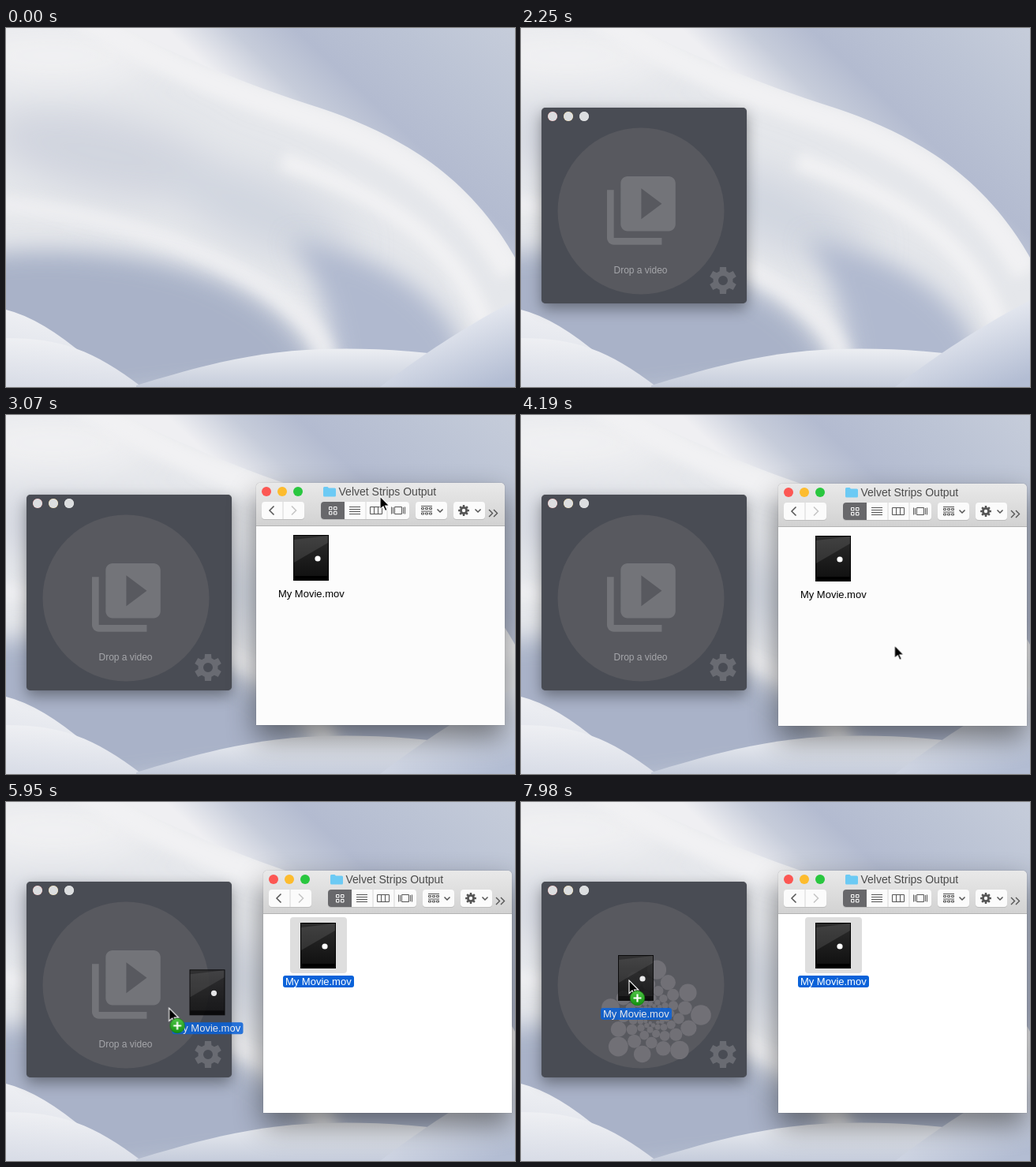
These frames come from a looping animation (645x455 px, 8 s). An HTML page:

```html
<!DOCTYPE html>
<html lang="en">
<head>
<meta charset="utf-8">
<title>Drop a video</title>
<style>
html, body { margin: 0; width: 100%; height: 100%; overflow: hidden; }
body { position: relative; background: #dfe2e9; font-family: "Liberation Sans", Arial, sans-serif; }
svg { position: absolute; left: 0; top: 0; display: block; overflow: visible; }
.win { position: absolute; left: 0; top: 0; }
#app, #finder, #cursor, #ghost, .balls, .balls g { animation: 8s linear infinite; }
.step { animation: 8s step-end infinite; }

#app { width: 260px; height: 248px; animation-name: appMove; }
#appBody { width: 100%; height: 100%; border-radius: 5px; background: #494c54; animation-name: appShadow; }
#appShow { animation-name: appShow; }
#idle { animation-name: idle; }
.prompt { animation: prompt 8s linear infinite; }
.balls { animation-name: ballsMove; fill: #717076; }
.balls g { animation-name: ballsSpin; }

#finderShow { animation-name: finderShow; }
#finder { width: 315px; height: 307px; animation-name: finderMove; }
#finderBody {
  width: 100%; height: 100%; border-radius: 5px 5px 0 0;
  box-shadow: 0 0 1px rgba(0,0,0,.5), 0 16px 36px rgba(0,0,0,.48);
  background: linear-gradient(#e9e9e9, #d2d2d2 54px, #b4b4b4 54px, #b4b4b4 55px, transparent 55px);
}
#page { animation-name: page; }
#picked { animation-name: picked; }
#plain { animation-name: plain; }

#ghostShow { animation-name: ghostShow; }
#ghost { animation-name: drag; animation-delay: 80ms; }
#cursorShow { animation-name: cursorShow; }
#cursor { animation-name: point; }
#badge { animation-name: badge; }

@keyframes appShow { 0% { visibility: hidden } 5.25%, 100% { visibility: visible } }
@keyframes appMove {
  0%, 5.25% { transform: translate(96px,190px); animation-timing-function: ease-out }
  11.875% { transform: translate(29px,113px) }
  14.75% { transform: translate(26px,102px) }
  15.5%, 100% { transform: translate(26px,101px) }
}
@keyframes appShadow {
  0% { box-shadow: 0 0 1px rgba(0,0,0,.5), 0 17px 36px rgba(0,0,0,.5) }
  28.125%, 100% { box-shadow: 0 0 1px rgba(0,0,0,.5), 0 7px 18px rgba(0,0,0,.38) }
}
@keyframes idle { 0% { opacity: 0 } 28.125%, 100% { opacity: 1 } }
@keyframes prompt { 0%, 76.25% { opacity: 1 } 79.5%, 100% { opacity: 0 } }
@keyframes ballsMove {
  0%, 76.25% { transform: translate(126px,126px) scale(0); animation-timing-function: ease-out }
  81.25% { transform: translate(149px,161px) scale(1) }
  86.25% { transform: translate(157px,167px) scale(1) }
  91.25% { transform: translate(154px,167px) scale(1) }
  95% { transform: translate(146px,165px) scale(1) }
  99.75%, 100% { transform: translate(141px,169px) scale(1) }
}
@keyframes ballsSpin { 0%, 76.25% { transform: rotate(-100deg) } 99.75%, 100% { transform: rotate(0) } }

@keyframes finderShow { 0% { visibility: hidden } 30.375%, 100% { visibility: visible } }
@keyframes finderMove {
  0%, 30.375% { transform: translate(243px,66px); animation-timing-function: ease-out }
  38.375% { transform: translate(317px,86px) }
  39.75% { transform: translate(320px,86px) }
  41.25%, 100% { transform: translate(326px,87px) }
}
@keyframes page { 0% { fill: #fcfcfc } 67.75%, 100% { fill: #fff } }
@keyframes picked { 0% { opacity: 0 } 57.5%, 100% { opacity: 1 } }
@keyframes plain { 0% { opacity: 1 } 57.5%, 100% { opacity: 0 } }

@keyframes ghostShow { 0% { visibility: hidden } 69.875%, 100% { visibility: visible } }
@keyframes drag {
  0%, 69.875% { transform: translate(326px,87px) }
  74.375% { transform: translate(146px,163px) }
  78.125% { transform: translate(29px,164px) }
  79.625% { transform: translate(33px,157px) }
  83.75% { transform: translate(89px,116px) }
  87.5% { transform: translate(112px,138px) }
  90.625% { transform: translate(58px,140px) }
  93.75% { transform: translate(70px,152px) }
  96.25% { transform: translate(88px,136px) }
  98.5%, 100% { transform: translate(76px,128px) }
}
@keyframes cursorShow {
  0% { visibility: hidden } 5.25% { visibility: visible }
  20% { visibility: hidden } 30.375%, 100% { visibility: visible }
}
@keyframes point {
  0%, 5.25% { transform: translate(235px,197px); animation-timing-function: ease-out }
  11.875% { transform: translate(168px,120px) }
  14.75% { transform: translate(165px,109px) }
  15.5%, 17.25% { transform: translate(165px,108px) }
  20%, 30.37% { transform: translate(293px,403px) }
  30.375% { transform: translate(400px,83px); animation-timing-function: ease-out }
  38.375% { transform: translate(474px,103px) }
  39.75% { transform: translate(477px,103px) }
  41.25% { transform: translate(483px,104px) }
  44.875%, 51.8% { transform: translate(485px,307px) }
  56.5%, 58.5% { transform: translate(392px,186px) }
  62.2%, 63.6% { transform: translate(473px,278px) }
  67.75%, 69.875% { transform: translate(387px,185px) }
  74.375% { transform: translate(207px,261px) }
  78.125% { transform: translate(90px,262px) }
  79.625% { transform: translate(94px,255px) }
  83.75% { transform: translate(150px,214px) }
  87.5% { transform: translate(173px,236px) }
  90.625% { transform: translate(119px,238px) }
  93.75% { transform: translate(131px,250px) }
  96.25% { transform: translate(149px,234px) }
  98.5%, 100% { transform: translate(137px,226px) }
}
@keyframes badge { 0% { opacity: 0 } 72.5%, 100% { opacity: 1 } }
</style>
</head>
<body>

<svg width="645" height="455" style="overflow:hidden">
  <defs>
    <filter id="b8" x="-30%" y="-30%" width="160%" height="160%"><feGaussianBlur stdDeviation="8"/></filter>
    <filter id="b15" x="-40%" y="-40%" width="180%" height="180%"><feGaussianBlur stdDeviation="15"/></filter>
    <filter id="b25" x="-50%" y="-60%" width="200%" height="220%"><feGaussianBlur stdDeviation="24"/></filter>
    <linearGradient id="far" gradientUnits="userSpaceOnUse" x1="250" y1="45" x2="490" y2="-210">
      <stop offset="0" stop-color="#efeff2"/><stop offset=".16" stop-color="#c6ccda"/>
      <stop offset=".32" stop-color="#b3bbd0"/><stop offset=".6" stop-color="#bcc4d5"/>
      <stop offset="1" stop-color="#cbd1dd"/>
    </linearGradient>
    <linearGradient id="hillA" x1=".5" y1="0" x2=".3" y2="1">
      <stop offset="0" stop-color="#f0f1f4"/><stop offset="1" stop-color="#d9dde7"/>
    </linearGradient>
    <linearGradient id="hillB" x1="0" y1="0" x2="0" y2="1">
      <stop offset="0" stop-color="#eceef2"/><stop offset="1" stop-color="#c5ccdb"/>
    </linearGradient>
    <linearGradient id="hillC" x1=".4" y1=".3" x2=".8" y2="1">
      <stop offset="0" stop-color="#e6e9f0"/><stop offset="1" stop-color="#b3bdd3"/>
    </linearGradient>
  </defs>
  <rect width="645" height="455" fill="#e5e7eb"/>
  <g filter="url(#b25)">
    <ellipse cx="125" cy="160" rx="150" ry="48" fill="#d0d4de" transform="rotate(12 125 160)"/>
    <ellipse cx="320" cy="232" rx="130" ry="42" fill="#d0d5df" transform="rotate(24 320 232)"/>
    <ellipse cx="60" cy="35" rx="130" ry="35" fill="#f1f1f3"/>
  </g>
  <g filter="url(#b15)">
    <path d="M-40 288C100 270 230 295 300 335C350 362 380 395 400 440L-40 490Z" fill="#a9b2c8"/>
    <path d="M360 268C440 280 520 310 570 385L590 450L420 450C415 380 400 320 360 268Z" fill="#b0b9cf"/>
  </g>
  <g fill="none" stroke="#f1f1f3" filter="url(#b8)">
    <path d="M-30 222C140 232 280 290 345 340C385 372 400 392 408 420" stroke-width="22" opacity=".8"/>
    <path d="M350 168C460 205 570 265 606 375" stroke-width="24"/>
    <path d="M90 -20C200 50 290 82 390 116C490 150 580 205 640 310" stroke-width="34"/>
  </g>
  <path d="M130 -10C215 35 300 70 400 102C500 136 590 188 650 300V-10Z" fill="url(#far)"/>
  <path d="M0 357Q45 368 103 418L120 455H0Z" fill="url(#hillA)"/>
  <path d="M0 393C70 393 110 408 172 455H0Z" fill="url(#hillA)"/>
  <path d="M165 453C260 424 320 410 400 407Q470 405 535 412L530 455H165Z" fill="url(#hillB)"/>
  <path d="M474 455C520 420 570 385 645 345V455Z" fill="url(#hillC)"/>
</svg>

<div id="appShow" class="step">
  <div id="app" class="win">
    <div id="appBody" class="step"></div>
    <svg width="260" height="248">
      <circle cx="126" cy="131" r="105.5" fill="#58595f"/>
      <path id="bigGear" fill="#696b72" fill-rule="evenodd"/>
      <g class="prompt">
        <path transform="translate(74.3 78.3) scale(4.34)" fill="#737479" d="M4 6H2v14c0 1.1.9 2 2 2h14v-2H4V6zm16-4H8c-1.1 0-2 .9-2 2v12c0 1.1.9 2 2 2h12c1.1 0 2-.9 2-2V4c0-1.1-.9-2-2-2zm-8 12.5v-9l6 4.5-6 4.5z"/>
        <text x="125.5" y="210" font-size="12" text-anchor="middle" fill="#a5a6aa">Drop a video</text>
      </g>
      <g class="balls"><g id="balls"></g></g>
      <circle cx="14" cy="11" r="6" fill="#fc5b55"/>
      <circle cx="34" cy="11" r="6" fill="#fdbd2d"/>
      <circle cx="54" cy="11" r="6" fill="#cfd0d2"/>
      <g id="idle" class="step" fill="#dcdee0">
        <circle cx="14" cy="11" r="6"/><circle cx="34" cy="11" r="6"/><circle cx="54" cy="11" r="6"/>
      </g>
    </svg>
  </div>
</div>

<div id="finderShow" class="step">
  <div id="finder" class="win">
    <div id="finderBody"></div>
    <svg width="315" height="307">
      <defs>
        <linearGradient id="film" x1="0" y1="0" x2="0" y2="1">
          <stop offset="0" stop-color="#2b2b2b"/><stop offset="1" stop-color="#121212"/>
        </linearGradient>
        <g id="movie">
          <rect x="47" y="66" width="45" height="58" fill="#000"/>
          <rect x="48" y="67" width="43" height="51" fill="url(#film)"/>
          <path d="M48 72L91 67V76L48 101Z" fill="#fff" opacity=".1"/>
          <circle cx="78" cy="96" r="3.6" fill="#fff"/>
        </g>
        <g id="tag">
          <rect x="25" y="133" width="90" height="15" rx="3" fill="#0a62d9"/>
          <text x="69.8" y="145" font-size="13" text-anchor="middle" fill="#fff">My Movie.mov</text>
        </g>
      </defs>
      <rect id="page" class="step" y="55" width="315" height="252"/>
      <circle cx="13" cy="11" r="6" fill="#fc5753"/>
      <circle cx="33" cy="11" r="6" fill="#fdbc2e"/>
      <circle cx="53" cy="11" r="6" fill="#29c73f"/>
      <path d="M85 6.5q0-1.500 1.500-1.500h4l1.500 1.500h7.500q1.500 0 1.500 1.500v8q0 1.500-1.500 1.500h-13q-1.500 0-1.500-1.500z" fill="#6ccaf4"/>
      <text x="104.500" y="16" font-size="14" fill="#4b4b4b">Velvet Strips Output</text>
      <g fill="#bdbdbd">
        <rect x="7" y="25" width="54" height="22" rx="4"/><rect x="82" y="25" width="112" height="22" rx="4"/>
        <rect x="202" y="25" width="40" height="22" rx="4"/><rect x="250" y="25" width="40" height="22" rx="4"/>
      </g>
      <g fill="#fbfbfb">
        <rect x="7" y="24" width="54" height="22" rx="4"/><rect x="82" y="24" width="112" height="22" rx="4"/>
        <rect x="202" y="24" width="40" height="22" rx="4"/><rect x="250" y="24" width="40" height="22" rx="4"/>
      </g>
      <path d="M86 24h26v22h-26q-4 0-4-4v-14q0-4 4-4z" fill="#68686b"/>
      <path d="M34 24v22M139 24v22M166 24v22" stroke="#d6d6d6"/>
      <g fill="none" stroke="#555">
        <path d="M22.500 29.500L17 35l5.500 5.500" stroke-width="1.500"/>
        <path d="M45 29.500L50.500 35L45 40.500" stroke="#c4c4c4" stroke-width="1.500"/>
        <path d="M92.500 30.500h3.500v3.500h-3.500zm6 0h3.500v3.500h-3.500zm-6 6h3.500v3.500h-3.500zm6 0h3.500v3.500h-3.500z" stroke="#fff"/>
        <path d="M118 30.500h14m-14 3h14m-14 3h14m-14 3h14"/>
        <path d="M144.500 30.500h15v9h-15zm5 0v9m5-9v9"/>
        <path d="M175.500 30.500h9v9h-9zM171.500 30.500v9M173.500 31v8M186.500 31v8M188.500 30.500v9"/>
        <path d="M209 29.500h14M209 36h14"/>
        <path d="M209.500 31.500h3v2h-3zm5 0h3v2h-3zm5 0h3v2h-3zm-10 6.500h3v2h-3zm5 0h3v2h-3zm5 0h3v2h-3z"/>
        <path d="M229.500 33.500l3.500 3.500 3.500-3.500M277.500 33.500l3.500 3.500 3.500-3.500" stroke-width="1.500"/>
        <path d="M295 34l4.500 4.500-4.500 4.500M301 34l4.500 4.500-4.500 4.500" stroke-width="1.400"/>
      </g>
      <path id="smallGear" fill="#555" fill-rule="evenodd"/>
      <text id="plain" class="step" x="69.8" y="145" font-size="13" text-anchor="middle">My Movie.mov</text>
      <g id="picked" class="step">
        <rect x="34" y="59" width="72" height="71" rx="4" fill="#dedede"/>
        <use href="#tag"/>
      </g>
      <use href="#movie"/>
    </svg>
  </div>
</div>

<div id="ghostShow" class="step">
  <svg id="ghost" width="315" height="307">
    <use href="#movie" opacity=".86"/><use href="#tag" opacity=".86"/>
  </svg>
</div>

<div id="cursorShow" class="step">
  <svg id="cursor" width="30" height="36">
    <defs>
      <linearGradient id="green" x1="0" y1="0" x2="0" y2="1">
        <stop offset="0" stop-color="#4fc447"/><stop offset="1" stop-color="#12910f"/>
      </linearGradient>
    </defs>
    <path d="M0 0V16.500L4 12.800 6.500 18.400 9 17.400 6.600 12H11.800Z" stroke="#fff" stroke-width="1.100"/>
    <g id="badge" class="step">
      <circle cx="10.500" cy="22.500" r="9.200" fill="url(#green)" stroke="#16800f" stroke-width=".8"/>
      <path d="M5.500 22.500h10M10.500 17.500v10" stroke="#fff" stroke-width="2.200"/>
    </g>
  </svg>
</div>

<script>
const $ = id => document.getElementById(id);

function gear(cx, cy, r, teeth, hole) {
  const step = 2 * Math.PI / teeth, pts = [];
  for (let i = 0; i < teeth; i++) {
    for (const [da, k] of [[-.34, .72], [-.22, 1], [.22, 1], [.34, .72]]) {
      const a = (i + da) * step - Math.PI / 2;
      pts.push((cx + r * k * Math.cos(a)).toFixed(2) + ' ' + (cy + r * k * Math.sin(a)).toFixed(2));
    }
  }
  return `M${pts.join('L')}Z M${cx - hole} ${cy}a${hole} ${hole} 0 1 0 ${2 * hole} 0a${hole} ${hole} 0 1 0 ${-2 * hole} 0Z`;
}
$('bigGear').setAttribute('d', gear(230, 219, 17.5, 6, 6));
$('smallGear').setAttribute('d', gear(263, 35, 7, 8, 2.2));

// Spiral of balls that shrink towards the middle
for (let i = 0; i < 66; i++) {
  const d = 61 * Math.exp(-.029 * i), a = i * 2.39996;
  const ball = document.createElementNS('http://www.w3.org/2000/svg', 'circle');
  ball.setAttribute('cx', d * Math.cos(a));
  ball.setAttribute('cy', d * Math.sin(a));
  ball.setAttribute('r', d * .21);
  $('balls').append(ball);
}
</script>
</body>
</html>
```
